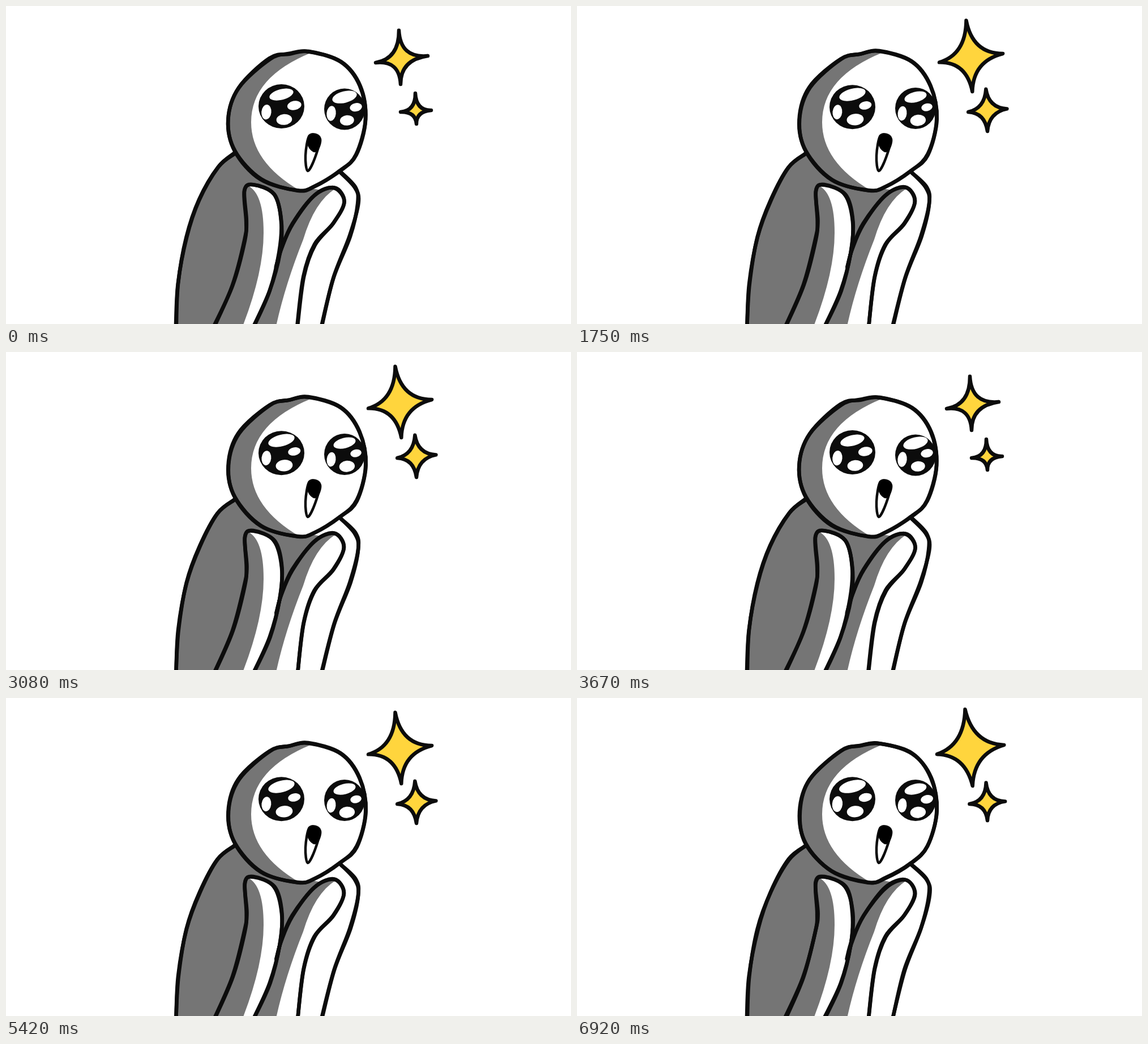
An HTML page with a canvas that plays this animation: 998 by 561 pixels, repeating every 7.01 s.

```html
<!DOCTYPE html>
<html lang="en">
<head>
<meta charset="utf-8">
<title>Starry eyes</title>
<style>
html, body { margin: 0; width: 100%; height: 100%; overflow: hidden; background: #fff; }
canvas { display: block; width: 998px; height: 561px; }
</style>
</head>
<body>
<canvas id="stage" width="998" height="561"></canvas>
<script>
const ctx = document.getElementById('stage').getContext('2d');
const INK = '#0c0c0c', GRAY = '#757575', GOLD = '#ffd53d';
const LOOP = 7010, DRAWINGS = 84, WOBBLE = 1;

const pts = text => text.split(' ').map(p => p.split(',').map(Number));
const mix = (a, b, t) => a + (b - a) * t;

// Key points of the figure
const head = pts('500,84 535,80 592,98 625,141 636,200 619,262 590,291 545,318 515,325 450,306 404,256 393,200 411,144 466,93');
const back = pts('404,260 374,285 342,342 319,408 304,490 300,565');
const leftArm = pts('368,565 400,492 421,413 425,380 422,326 437,315 474,333 487,380 483,435 466,503 437,565');
const rightArm = pts('477,460 486,428 506,384 545,334 580,320 597,345 578,383 545,421 526,478 515,565');
const shoulder = pts('589,292 617,320 622,348 608,406 579,480 558,565');
const mouth = pts('536,229 554,233 546,267 533,291 529,264');
const throat = pts('535,227 556,232 554,250 544,258 533,246');
const faceShade = new Path2D('M540 82Q433 125 433 205Q433 275 518 325L380 340V70H540Z');

const eyes = [{ x: 486.5, y: 178, rx: 38, ry: 36.5 }, { x: 598, y: 181, rx: 33.5, ry: 34 }];
// Highlights, in units of the eye's radii
const glints = [
  { x: 0, y: -0.6, w: 0.6, h: 0.27, tilt: -0.25 },
  { x: 0.6, y: -0.07, w: 0.3, h: 0.2, tilt: -0.2 },
  { x: 0.13, y: 0.61, w: 0.38, h: 0.27, tilt: -0.1 },
  { x: -0.7, y: 0.25, w: 0.22, h: 0.35, tilt: 0.1 }
];

// Tips at the smallest and largest size, and the growth in each drawing
const stars = [
  { small: pts('694,43 745,88 697,138 653,100'), large: pts('684,16 756,82 699,158 633,99'), grow: [0, 0.65, 1, 0.85] },
  { small: pts('723,154 751,184 725,208 697,187'), large: pts('722,143 764,180 725,228 688,187'), grow: [0, 0.65, 1, 0.4] }
];

// Repeatable noise in -1..1
function noise(seed) {
  const v = Math.sin(seed * 12.9898) * 43758.5453;
  return 2 * (v - Math.floor(v)) - 1;
}

const wobble = (list, seed) => list.map(([x, y], i) => [
  x + WOBBLE * noise(seed + i), y + WOBBLE * noise(seed + i + 50)
]);

// Adds a smooth curve through the points to the current path
function curve(list, closed) {
  const n = list.length;
  const at = i => closed ? list[(i + n) % n] : list[Math.max(0, Math.min(n - 1, i))];
  ctx.moveTo(...list[0]);
  for (let i = 0; i < (closed ? n : n - 1); i++) {
    const [p, a, b, q] = [at(i - 1), at(i), at(i + 1), at(i + 2)];
    ctx.bezierCurveTo(a[0] + (b[0] - p[0]) / 6, a[1] + (b[1] - p[1]) / 6,
      b[0] - (q[0] - a[0]) / 6, b[1] - (q[1] - a[1]) / 6, ...b);
  }
  if (closed) ctx.closePath();
}

function trace(list, closed) {
  ctx.beginPath();
  curve(list, closed);
}

function fill(color) {
  ctx.fillStyle = color;
  ctx.fill();
}

function stroke(width) {
  ctx.lineWidth = width;
  ctx.stroke();
}

// Two loose passes make a pen line of uneven weight
function penLine(list, seed, closed) {
  for (const pass of [0, 100]) {
    trace(wobble(list, seed + pass), closed);
    stroke(6.6);
  }
}

function shadeBody() {
  trace(back);
  ctx.lineTo(418, 565);
  ctx.quadraticCurveTo(455, 470, 455, 400);
  ctx.quadraticCurveTo(455, 330, 427, 317);
  ctx.lineTo(465, 316);
  fill(GRAY);
  trace(leftArm.slice(5));
  ctx.lineTo(477, 565);
  ctx.quadraticCurveTo(493, 492, 525, 412);
  ctx.quadraticCurveTo(545, 345, 582, 322);
  ctx.lineTo(552, 324);
  ctx.lineTo(470, 310);
  fill(GRAY);
}

function shadeHead() {
  trace(head, true);
  fill('#fff');
  ctx.save();
  ctx.clip();
  ctx.fillStyle = GRAY;
  ctx.fill(faceShade);
  ctx.restore();
}

function drawEye(eye, seed) {
  ctx.beginPath();
  ctx.ellipse(eye.x, eye.y + noise(seed), eye.rx + 2.5, eye.ry + 2.5, 0, 0, Math.PI * 2);
  fill(INK);
  glints.forEach((g, i) => {
    const size = 1.03 + 0.08 * noise(seed + i);
    ctx.beginPath();
    ctx.ellipse(eye.x + g.x * eye.rx, eye.y + g.y * eye.ry,
      g.w * eye.rx * size, g.h * eye.ry * size, g.tilt, 0, Math.PI * 2);
    fill('#fff');
  });
}

function drawStar({ small, large, grow }, drawing) {
  const g = grow[drawing];
  const tips = small.map(([x, y], i) => [mix(x, large[i][0], g), mix(y, large[i][1], g)]);
  const cx = (tips[0][0] + tips[2][0]) / 2, cy = (tips[1][1] + tips[3][1]) / 2;
  const pull = 0.95 - 0.25 * g;
  ctx.beginPath();
  ctx.moveTo(...tips[0]);
  tips.forEach((a, i) => {
    const b = tips[(i + 1) % 4];
    ctx.quadraticCurveTo(mix((a[0] + b[0]) / 2, cx, pull), mix((a[1] + b[1]) / 2, cy, pull), ...b);
  });
  ctx.closePath();
  fill(GOLD);
  stroke(6.5);
}

function draw(drawing) {
  const seed = drawing * 200;
  ctx.fillStyle = '#fff';
  ctx.fillRect(0, 0, 998, 561);
  ctx.strokeStyle = INK;
  ctx.lineCap = ctx.lineJoin = 'round';
  shadeBody();
  shadeHead();
  [back, leftArm, rightArm, shoulder].forEach((list, i) => penLine(list, seed + i * 20));
  penLine(head, seed + 80, true);
  eyes.forEach((eye, i) => drawEye(eye, seed + i * 10));
  trace(mouth, true);
  stroke(4.5);
  trace(throat, true);
  fill('#000');
  stars.forEach(star => drawStar(star, drawing));
}

// Twelve drawings a second, on times rounded to 10 ms
const startOf = i => Math.round(i * 25 / 3) * 10;
let shown = -1;

function tick() {
  const t = performance.now() % LOOP;
  let i = Math.min(DRAWINGS - 1, Math.floor(t * 3 / 250) + 1);
  while (startOf(i) > t) i--;
  if (i % 4 !== shown) {
    shown = i % 4;
    draw(shown);
  }
  requestAnimationFrame(tick);
}
tick();
</script>
</body>
</html>
```
